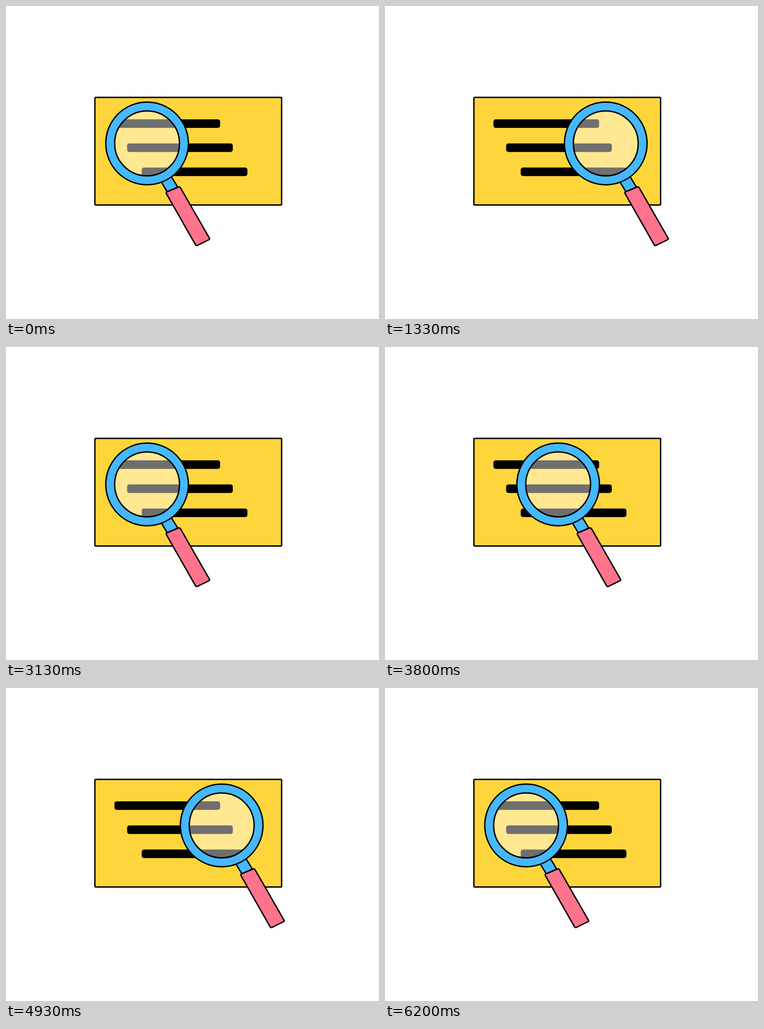
Animation, 817 px wide and 685 px high, one loop 6.23 s. Source, as an HTML page:

```html
<!DOCTYPE html>
<html lang="en">
<head>
<meta charset="utf-8">
<title>Searching</title>
<style>
  html, body { margin: 0; width: 100%; height: 100%; overflow: hidden; background: #fff; }
  svg { display: block; }
  .line { stroke: #000; stroke-width: 3; stroke-linejoin: round; }
</style>
</head>
<body>
<svg width="817" height="685" viewBox="0 0 817 685">
  <rect class="line" x="194.7" y="200" width="409" height="235.5" rx="2" fill="#fed63c"/>
  <g>
    <rect x="237.5" y="248" width="231.5" height="18.7" rx="5"/>
    <rect x="265.3" y="300.7" width="231.5" height="18.7" rx="5"/>
    <rect x="297.3" y="353.5" width="231.5" height="18.7" rx="5"/>
  </g>
  <g id="glass">
    <path class="line" fill="#46b8ff" d="M340 385L362 373L376 396L354 408Z"/>
    <path class="line" fill="#ff738d" d="M351.5 407Q350.5 409 351.5 411L415 522.5Q416.5 525 419 524L444.5 511.5Q447 510 445.5 508L382 397.5Q380.5 395 378 396Z"/>
    <circle cx="309" cy="300.7" r="71" fill="#fff" fill-opacity=".435"/>
    <g fill="none">
      <circle cx="309" cy="300.7" r="80.75" stroke="#46b8ff" stroke-width="19.5"/>
      <circle class="line" cx="309" cy="300.7" r="90.5"/>
      <circle class="line" cx="309" cy="300.7" r="71"/>
    </g>
  </g>
</svg>
<script>
  const LOOP = 6230, SWEEP = 1390, TRAVEL = 175;
  const glass = document.getElementById('glass');
  const begin = performance.now();

  const ease = u => u < .5 ? 4 * u ** 3 : 1 - 4 * (1 - u) ** 3;
  const sweep = (t, start) => ease(Math.min(1, Math.max(0, (t - start) / SWEEP)));

  function draw() {
    const t = (performance.now() - begin) % LOOP;
    const pos = sweep(t, 60) - sweep(t, 1455) + sweep(t, 3155) - sweep(t, 4577);
    glass.setAttribute('transform', `translate(${(TRAVEL * pos).toFixed(2)} 0)`);
    requestAnimationFrame(draw);
  }
  draw();
</script>
</body>
</html>
```
